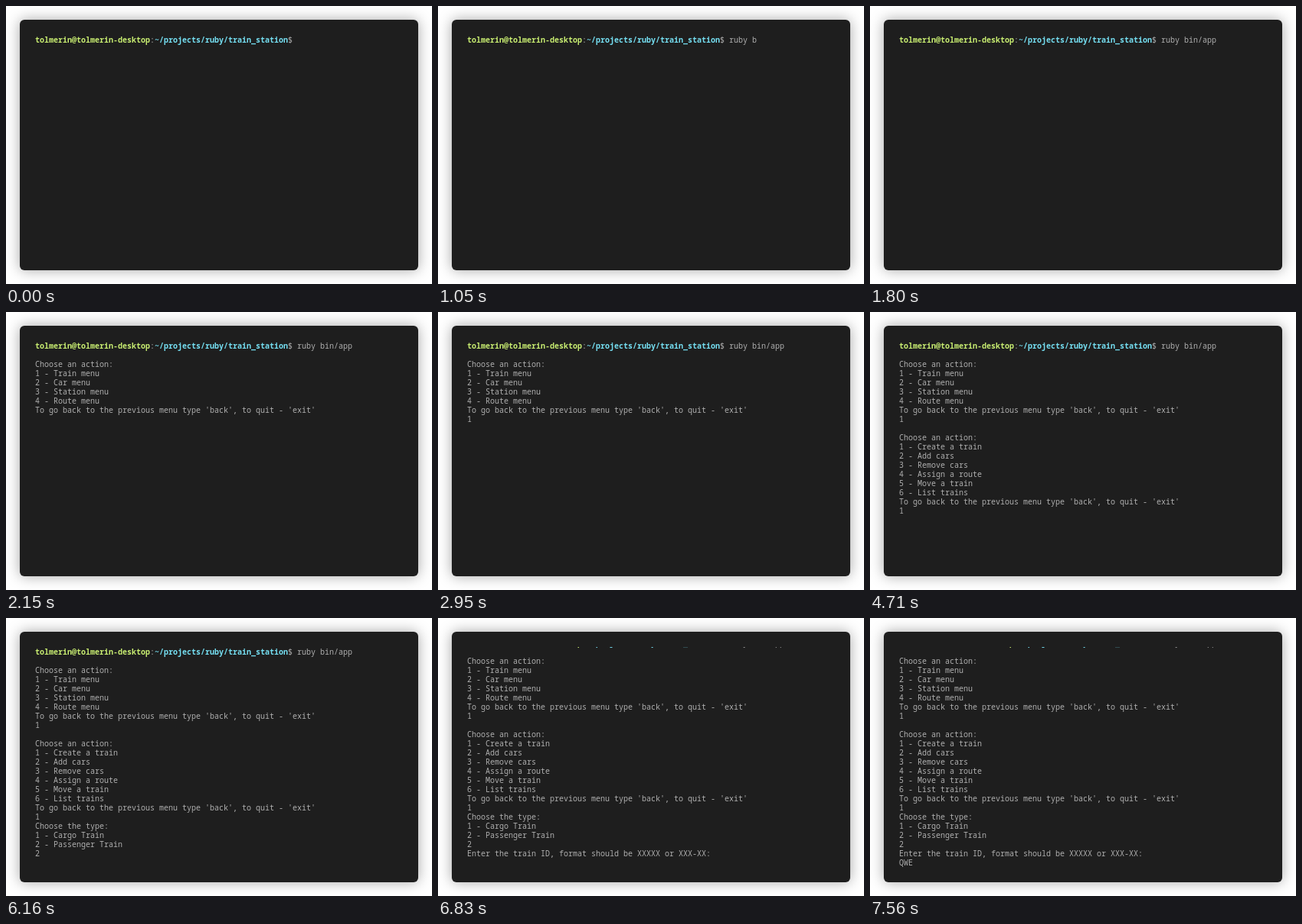
An HTML page that plays this animation: 556x364 px, repeating every 8000 ms.

```html
<!DOCTYPE html>
<html lang="en">
<head>
<meta charset="utf-8">
<title>Terminal session</title>
<style>
  html, body {
    margin: 0;
    width: 100%;
    height: 100%;
    overflow: hidden;
    background: #fff;
  }
  .window {
    position: absolute;
    left: 18px;
    top: 18px;
    width: 520px;
    height: 328px;
    border-radius: 6px;
    background: #1e1e1e;
    box-shadow: 0 0 18px rgba(0, 0, 0, .35);
  }
  .screen {
    position: absolute;
    left: 20px;
    top: 20px;
    width: 480px;
    height: 288px;
    overflow: hidden;
  }
  pre {
    margin: 0;
    color: #afafaf;
    font: 10px/12px "Noto Sans Mono", "Liberation Mono", monospace;
    font-variant-ligatures: none;
  }
  b { font-weight: 700; }
  .user { color: #c8ed71; }
  .path { color: #75dff2; }
</style>
</head>
<body>
<div class="window">
  <div class="screen">
    <pre id="term"><b class="user">tolmerin@tolmerin-desktop</b>:<b class="path">~/projects/ruby/train_station</b>$ <span id="out"></span></pre>
  </div>
</div>
<script>
  const LOOP = 8000, ROWS = 24, ROW_HEIGHT = 12;
  const term = document.getElementById('term');
  const out = document.getElementById('out');

  const list = (title, items) =>
    `${title}:\n` + items.map((item, i) => `${i + 1} - ${item}\n`).join('');
  const menu = items => '\n\n' + list('Choose an action', items) +
    "To go back to the previous menu type 'back', to quit - 'exit'\n";
  const type = (text, times) => times.map((t, i) => [t, text[i]]);

  // [time in ms, text added to the terminal]
  const session = [
    ...type(['r', 'u', 'b', 'y', ' b', 'i', 'n', '/', 'a', 'p', 'p'],
      [500, 590, 680, 840, 1050, 1140, 1240, 1410, 1560, 1660, 1800]),
    [2150, menu(['Train menu', 'Car menu', 'Station menu', 'Route menu'])],
    [2950, '1'],
    [3570, menu(['Create a train', 'Add cars', 'Remove cars',
      'Assign a route', 'Move a train', 'List trains'])],
    [4710, '1'],
    [5050, '\n' + list('Choose the type', ['Cargo Train', 'Passenger Train'])],
    [6160, '2'],
    [6830, '\nEnter the train ID, format should be XXXXX or XXX-XX:\n'],
    ...type('QWE', [7420, 7490, 7560])
  ];

  const start = performance.now();
  let shown = -1;

  function draw(now) {
    const t = Math.max(0, now - start) % LOOP;
    const done = session.filter(([at]) => at <= t);
    if (done.length !== shown) {
      shown = done.length;
      const text = done.map(([, added]) => added).join('');
      const scroll = Math.max(0, text.split('\n').length - ROWS);
      out.textContent = text;
      term.style.marginTop = `${-scroll * ROW_HEIGHT}px`;
    }
    requestAnimationFrame(draw);
  }
  draw(start);
</script>
</body>
</html>
```
